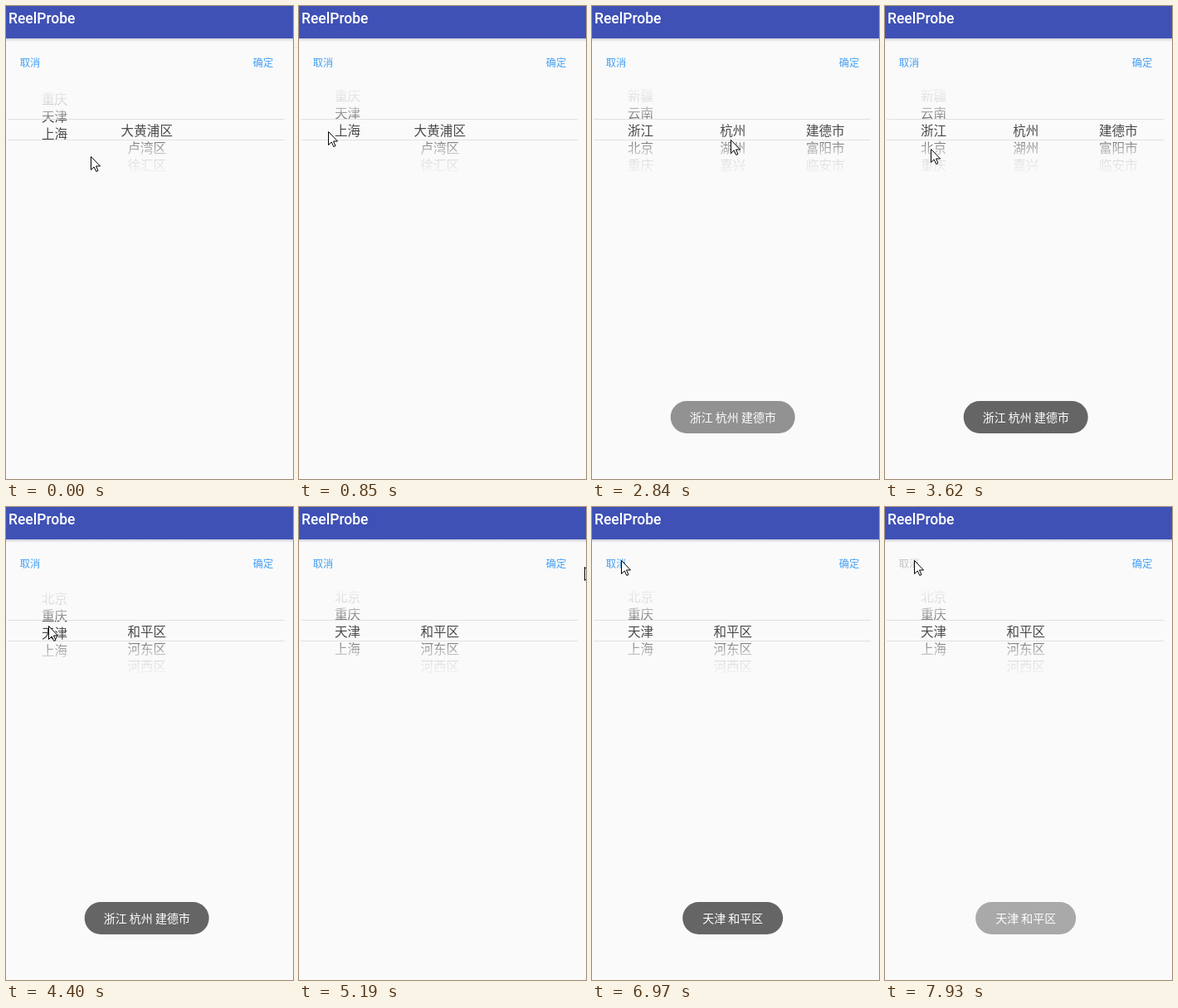
An HTML page for the animation above (8 s loop, 346x570 px).

```html
<!DOCTYPE html>
<html lang="zh-CN">
<head>
<meta charset="utf-8">
<style>
  html, body { margin: 0; width: 100%; height: 100%; overflow: hidden; background: #fafafa; }
  svg { display: block; width: 346px; height: 570px; font-family: "Noto Sans CJK SC", "Noto Sans CJK", sans-serif; }
  .title { font: 500 17.5px Roboto, sans-serif; fill: #fff; }
  .button { font-size: 12.3px; fill: #45a0f5; }
  .button.pressed { fill: #c4c4c4; }
  .wheel { font-size: 15.6px; fill: #4a4a4a; text-anchor: middle; }
  .toast { font-size: 14px; fill: #fff; text-anchor: middle; }
</style>
</head>
<body>
<svg viewBox="0 0 346 570">
  <defs>
    <linearGradient id="fade" x2="0" y2="1">
      <stop stop-color="#fafafa" stop-opacity=".96"/>
      <stop offset=".5" stop-color="#fafafa" stop-opacity=".81"/>
      <stop offset="1" stop-color="#fafafa" stop-opacity=".25"/>
    </linearGradient>
    <linearGradient id="shadow" x2="0" y2="1">
      <stop stop-color="#cfd0da"/>
      <stop offset="1" stop-color="#fafafa"/>
    </linearGradient>
    <clipPath id="window"><rect y="98" width="346" height="104"/></clipPath>
  </defs>
  <rect width="346" height="570" fill="#fafafa"/>
  <rect width="346" height="39" fill="#3f51b5"/>
  <rect y="39" width="346" height="4" fill="url(#shadow)"/>
  <text class="title" x="3" y="21">ReelProbe</text>
  <text class="button" id="cancel" x="16.8" y="73">取消</text>
  <text class="button" id="confirm" x="297.8" y="73">确定</text>
  <g class="wheel" clip-path="url(#window)">
    <g id="provinces"></g>
    <g id="cities"></g>
    <g id="districts"></g>
  </g>
  <rect y="97" width="346" height="39" fill="url(#fade)"/>
  <rect width="346" height="40" fill="url(#fade)" transform="matrix(1 0 0 -1 0 202)"/>
  <path d="M2 136.5H336M2 161.5H336" stroke="#e1e1e1"/>
  <g class="toast" id="toast">
    <rect id="pill" y="476" height="39" rx="19.5" fill="#656565"/>
    <text id="message" x="169.8" y="500.7"></text>
  </g>
  <path id="cursor" d="M.5.5V16.5L4.2 13 6.8 18.5 9 17.5 6.5 12H11.5Z" fill="#fff" stroke="#000"/>
</svg>
<script>
const LOOP = 8000, STEP = 133; // the screen refreshes every STEP ms
const ROW = 21, MIDDLE = 156;
const $ = id => document.getElementById(id);

// Stops of the pointer: time, x, y.
const POINTER = [
  [0, 102, 181], [400, 224, 144], [665, 26, 161], [1065, 53, 130], [1460, 65, 193],
  [1995, 292, 71], [2530, 296, 68], [2790, 169, 161], [3060, 2, 177], [3325, 112, 174],
  [3590, 55, 172], [4390, 51, 143], [4790, 59, 143], [5185, 344, 72], [5590, 317, 72],
  [5985, 94, 150], [6250, 12, 105], [6650, 35, 64]
];
// Row in the middle of the province wheel: drag, fling, settle.
const SCROLL = [
  [0, 6.82], [266, 7], [1100, 7], [1460, 2.72], [1730, 3],
  [3720, 3], [4120, 5.75], [4390, 5.92], [4655, 6]
];
const TOASTS = [
  { start: 2550, end: 5150, width: 150, text: "浙江 杭州 建德市" },
  { start: 5663, end: 8090, width: 121, text: "天津 和平区" }
];
const PROVINCES = ["西藏", "新疆", "云南", "浙江", "北京", "重庆", "天津", "上海"];
const AREAS = [
  { from: 0, cities: ["大黄浦区", "卢湾区", "徐汇区"], districts: [] },
  { from: 1330, cities: ["杭州", "湖州", "嘉兴"], districts: ["建德市", "富阳市", "临安市"] },
  { from: 3990, cities: ["和平区", "河东区", "河西区"], districts: [] }
];

const clamp = v => Math.max(0, Math.min(1, v));

function along(stops, t) {
  const i = stops.findLastIndex(s => s[0] <= t);
  const a = stops[i], b = stops[i + 1] || a;
  const k = clamp((t - a[0]) / (b[0] - a[0] || 1));
  return a.slice(1).map((v, n) => v + (b[n + 1] - v) * k);
}

function fill(id, x, names) {
  $(id).innerHTML = names.map((name, i) =>
    `<text x="${x}" y="${MIDDLE + i * ROW}">${name}</text>`).join("");
}

function showToast(t) {
  const { start, end, width, text } = TOASTS.find(toast => t < toast.end);
  $("message").textContent = text;
  $("pill").setAttribute("width", width);
  $("pill").setAttribute("x", 169.7 - width / 2);
  $("toast").setAttribute("opacity", clamp((t - start) / 350) * clamp((end - t) / 450));
}

function draw(t) {
  const area = AREAS.findLast(a => a.from <= t);
  fill("cities", 169.8, area.cities);
  fill("districts", 281.3, area.districts);
  $("provinces").setAttribute("transform", `translate(0 ${-along(SCROLL, t)[0] * ROW})`);
  $("cursor").setAttribute("transform", `translate(${along(POINTER, t).map(Math.round)})`);
  // A press comes shortly before its toast.
  const confirming = TOASTS.some(({ start }) => t > start - 280 && t < start - 130);
  $("confirm").classList.toggle("pressed", confirming);
  $("cancel").classList.toggle("pressed", t > 7800);
  showToast(t);
}

function frame() {
  const t = performance.now() % LOOP;
  draw(t - t % STEP);
  requestAnimationFrame(frame);
}

fill("provinces", 58.5, PROVINCES);
frame();
</script>
</body>
</html>
```
